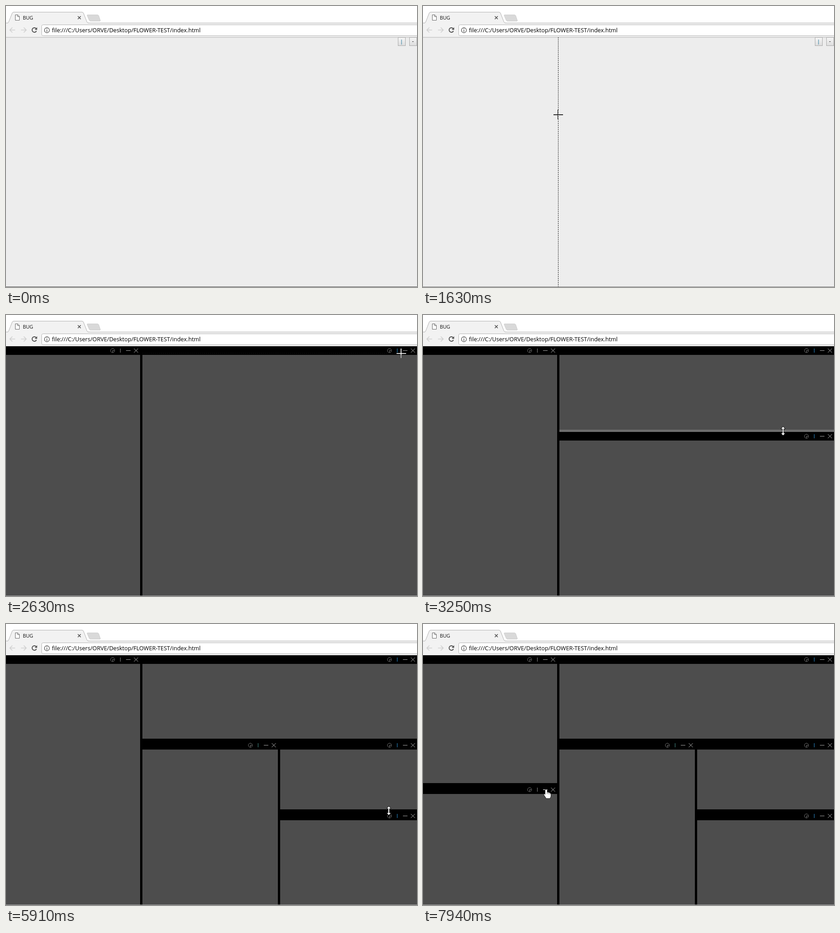
An HTML page with a canvas for the animation above (7990 ms loop, 904x620 px).

```html
<!DOCTYPE html>
<html lang="en">
<head>
<meta charset="utf-8">
<title>Split panes</title>
<style>
html, body { margin: 0; width: 100%; height: 100%; overflow: hidden; background: #fff; }
svg, canvas { position: absolute; left: 0; top: 0; width: 904px; height: 620px; }
text { font-family: "Open Sans", "Noto Sans", sans-serif; }
</style>
</head>
<body>
<svg viewBox="0 0 904 620" fill="none">
  <path d="M0 38H904V69H0Z" fill="#f2f2f2"/>
  <path d="M0 69H904V70H0Z" fill="#ededed"/>
  <path d="M0 37.5H904M0 69.1H904" stroke="#b0b0b0"/>
  <path d="M3 38.5Q5 37.5 6 35L13.5 16Q14.5 13.5 17 13.5H167Q169.5 13.5 170.5 16L178 35Q179 37.5 182 38.5Z" fill="#f2f2f2"/>
  <path d="M3 37.5Q5 37.5 6 35L13.5 16Q14.5 13.5 17 13.5H167Q169.5 13.5 170.5 16L178 35Q179 37.5 182 37.5" stroke="#b0b0b0"/>
  <path d="M180 19.5H201Q203 19.5 204 21.5L207.5 32Q208 33.5 206 33.5H186Q184 33.5 183 31.5L178.500 21Q178 19.5 180 19.5Z" fill="#d9d9d9" stroke="#cecece"/>
  <path d="M20.5 19.5H26L29.5 23V31.5H20.5ZM25.5 19.5V23.5H29.5" fill="#fff" stroke="#666"/>
  <text x="37" y="30" font-size="10.8" fill="#111">BUG</text>
  <path d="M158 22.5L164.5 29M164.5 22.5L158 29" stroke="#505050" stroke-width="1.6"/>
  <path d="M20 53H9M14 47.5L8.5 53L14 58.5M33 53H44M39 47.5L44.5 53L39 58.5" stroke="#d0d0d0" stroke-width="1.7"/>
  <path d="M66.5 50A5 5 0 1 0 67 55" stroke="#505050" stroke-width="1.9"/>
  <path d="M68.5 47V52.5H63Z" fill="#505050"/>
  <rect x="78.5" y="41.5" width="840" height="24" rx="3" fill="#fff" stroke="#b4b4b4"/>
  <circle cx="90" cy="53.5" r="5.5" stroke="#555" stroke-width="1.3"/>
  <path d="M90 50V51.5M90 52.7V57" stroke="#555" stroke-width="1.5"/>
  <text x="101" y="57.5" font-size="12.63" fill="#000">file:///C:/Users/ORVE/Desktop/FLOWER-TEST/index.html</text>
</svg>
<canvas id="stage" width="904" height="620"></canvas>
<script>
const ctx = document.getElementById('stage').getContext('2d');
const LOOP = 7990, STEP = 77, HEADER = 19, GAP = 5;

// pane index, direction, position
const splits = [[0, 'v', 297], [1, 'h', 255], [2, 'v', 600], [3, 'h', 411], [0, 'h', 353]];

// start, end, target x, target y, cursor, splits done, highlighted divider
const legs = [
  [70, 610, 869, 79, 'arrow', 0],
  [930, 1630, 297, 239, 'cross', 0],
  [1710, 1710, 298, 240, 'arrow', 1],
  [1780, 2550, 874, 74, 'arrow', 1],
  [2630, 3100, 792, 255, 'cross', 1],
  [3170, 3250, 792, 256, 'ns', 2, 1],
  [3330, 3410, 833, 274, 'arrow', 2],
  [3480, 3800, 863, 263, 'arrow', 2],
  [3960, 4430, 600, 340, 'cross', 2],
  [4500, 4580, 600, 342, 'ew', 3, 2],
  [4730, 4730, 673, 347, 'arrow', 3],
  [4805, 5440, 875, 265, 'arrow', 3],
  [5590, 5750, 842, 411, 'cross', 3],
  [5825, 5910, 842, 412, 'ns', 4],
  [5970, 6360, 277, 160, 'arrow', 4],
  [6440, 6740, 268, 77, 'arrow', 4],
  [6910, 7220, 260, 353, 'cross', 4],
  [7370, 7370, 259, 355, 'ns', 5],
  [7450, 7520, 260, 377, 'arrow', 5],
  [7600, 7600, 258, 369, 'arrow', 5],
  [7750, 7940, 271, 365, 'arrow', 5]
];

const ease = p => p * p * (3 - 2 * p);

function rect(x, y, w, h, color) {
  ctx.fillStyle = color;
  ctx.fillRect(x, y, w, h);
}

function stroke(d, color, width = 1) {
  ctx.strokeStyle = color;
  ctx.lineWidth = width;
  ctx.stroke(new Path2D(d));
}

function pointerAt(t) {
  let from = [889, 560], now = null;
  for (const [start, end, x, y, kind, done, lit] of legs) {
    if (t < start) break;
    const n = Math.round((end - start) / STEP);
    const i = Math.min(n, Math.floor((t - start) / STEP + 0.08));
    const p = ease((i + 1) / (n + 1));
    now = {
      x: Math.round(from[0] + (x - from[0]) * p),
      y: Math.round(from[1] + (y - from[1]) * p),
      kind, done, lit
    };
    from = [x, y];
  }
  return now;
}

function layout(count) {
  const panes = [{ x: 0, y: 69, r: 904, b: 619 }], dividers = [];
  for (const [index, dir, at] of splits.slice(0, count)) {
    const a = panes[index], lo = at - 2, hi = lo + GAP;
    if (dir === 'v') {
      panes.splice(index, 1, { ...a, r: lo }, { ...a, x: hi });
      dividers.push([lo, a.y, GAP, a.b - a.y]);
    } else {
      panes.splice(index, 1, { ...a, b: lo }, { ...a, y: hi });
      dividers.push([a.x, lo, a.r - a.x, GAP]);
    }
  }
  return { panes, dividers };
}

function hoveredIcon(pane, m) {
  if (m.kind !== 'arrow' || m.y < pane.y || m.y >= pane.y + HEADER || m.x >= pane.r) return -1;
  const k = Math.floor((pane.r - m.x) / 17.3);
  return k < 4 && m.x >= pane.x ? k : -1;
}

function drawPane(pane, hot) {
  const { x, y, r, b } = pane, cy = y + 9.5;
  rect(x, y, r - x, HEADER, '#000');
  rect(x, y + HEADER, r - x, b - y - HEADER, '#4d4d4d');
  const tint = (k, color) => hot === k ? '#fff' : color;
  stroke(`M${r - 13.5} ${cy - 4.5}l9 9m0 -9l-9 9`, tint(0, '#b4b4b4'));
  rect(r - 31, y + 9, 10, 1, tint(1, '#a8a8a8'));
  rect(r - 44, y + 5, 1, 9, tint(2, r === 904 ? '#2b8fd0' : r === 598 ? '#4a918c' : '#8a8a8a'));
  const cx = r - 60.5;
  stroke(`M${cx - 4.5} ${cy}a4.5 4.5 0 1 1 9 0a4.5 4.5 0 1 1 -9 0M${cx + 3.5} ${cy}H${cx}V${cy + 4}`, tint(3, '#777'));
}

function drawButton(x, label, color, hot) {
  const shade = ctx.createLinearGradient(0, 70, 0, 88);
  shade.addColorStop(0, hot ? '#fff' : '#f6f6f6');
  shade.addColorStop(1, hot ? '#eee' : '#dcdcdc');
  rect(x, 69, 17, 19, hot ? '#888' : '#a9a9a9');
  rect(x + 1, 70, 15, 17, shade);
  ctx.fillStyle = color;
  ctx.font = '600 11px "Open Sans", sans-serif';
  ctx.textAlign = 'center';
  ctx.fillText(label, x + 8, 82);
}

const arrow = new Path2D('M.5 .5V14.5L3.7 11.5L6 16.5L8.3 15.5L6 10.7H10.3Z');
const hand = new Path2D('M-2 1.5Q0 -1 2 1.5V7Q4 5.5 5 7.5Q7 6 8 8.5Q10 8 10 10.5V14Q10 17 8 19.5H0Q-2 16 -4.5 12.5Q-5.5 10 -3.5 10L-2 12Z');
const resize = new Path2D('M0 -9.5L4 -5H1V5H4L0 9.5L-4 5H-1V-5H-4Z');

function drawPointer(m) {
  ctx.save();
  ctx.translate(m.x, m.y);
  if (m.kind === 'cross') {
    const cross = new Path2D();
    cross.rect(-1, -10, 1.8, 21);
    cross.rect(-10, 0, 21, 1.8);
    ctx.globalCompositeOperation = 'difference';
    ctx.fillStyle = '#fff';
    ctx.fill(cross);
  } else {
    if (m.kind === 'ew') ctx.rotate(Math.PI / 2);
    const shape = { arrow, hand }[m.kind] || resize;
    ctx.lineWidth = 1.6;
    ctx.strokeStyle = '#111';
    ctx.fillStyle = '#fff';
    ctx.stroke(shape);
    ctx.fill(shape);
    if (m.kind === 'hand') stroke('M2 7V10M5 8V10.5M8 9V11', '#333', 0.8);
  }
  ctx.restore();
}

function drawGuide(m, panes) {
  const [index, dir] = splits[m.done], a = panes[index];
  ctx.setLineDash([2.7, 1.8]);
  stroke(dir === 'v' ? `M${m.x + 0.5} ${a.y}V${a.b}` : `M${a.x} ${m.y + 0.5}H${a.r}`, '#111');
  ctx.setLineDash([]);
}

function draw(t) {
  const m = pointerAt(t), done = m ? m.done : 0;
  const dragging = m && m.kind === 'cross';
  const { panes, dividers } = layout(done);
  ctx.clearRect(0, 0, 904, 620);
  rect(0, 619, 904, 1, done ? '#a0a0a0' : dragging ? '#808080' : '#555');
  if (done) {
    rect(0, 69, 904, 550, '#000');
    let over = false;
    for (const pane of panes) {
      const hot = hoveredIcon(pane, m);
      over = over || hot >= 0;
      drawPane(pane, hot);
    }
    if (m.lit) rect(...dividers[m.lit], '#6e6e6e');
    if (over) m.kind = 'hand';
  } else {
    rect(0, 70, 904, 549, '#ededed');
    const hot = m && m.kind === 'arrow' && m.y < 88 && m.x >= 862 && m.x < 879;
    drawButton(862, '|', '#23789c', hot);
    drawButton(887, '-', '#222', false);
  }
  if (m) {
    if (dragging) drawGuide(m, panes);
    drawPointer(m);
  }
}

const begin = performance.now();
function tick() {
  draw((performance.now() - begin) % LOOP);
  requestAnimationFrame(tick);
}
tick();
</script>
</body>
</html>
```
